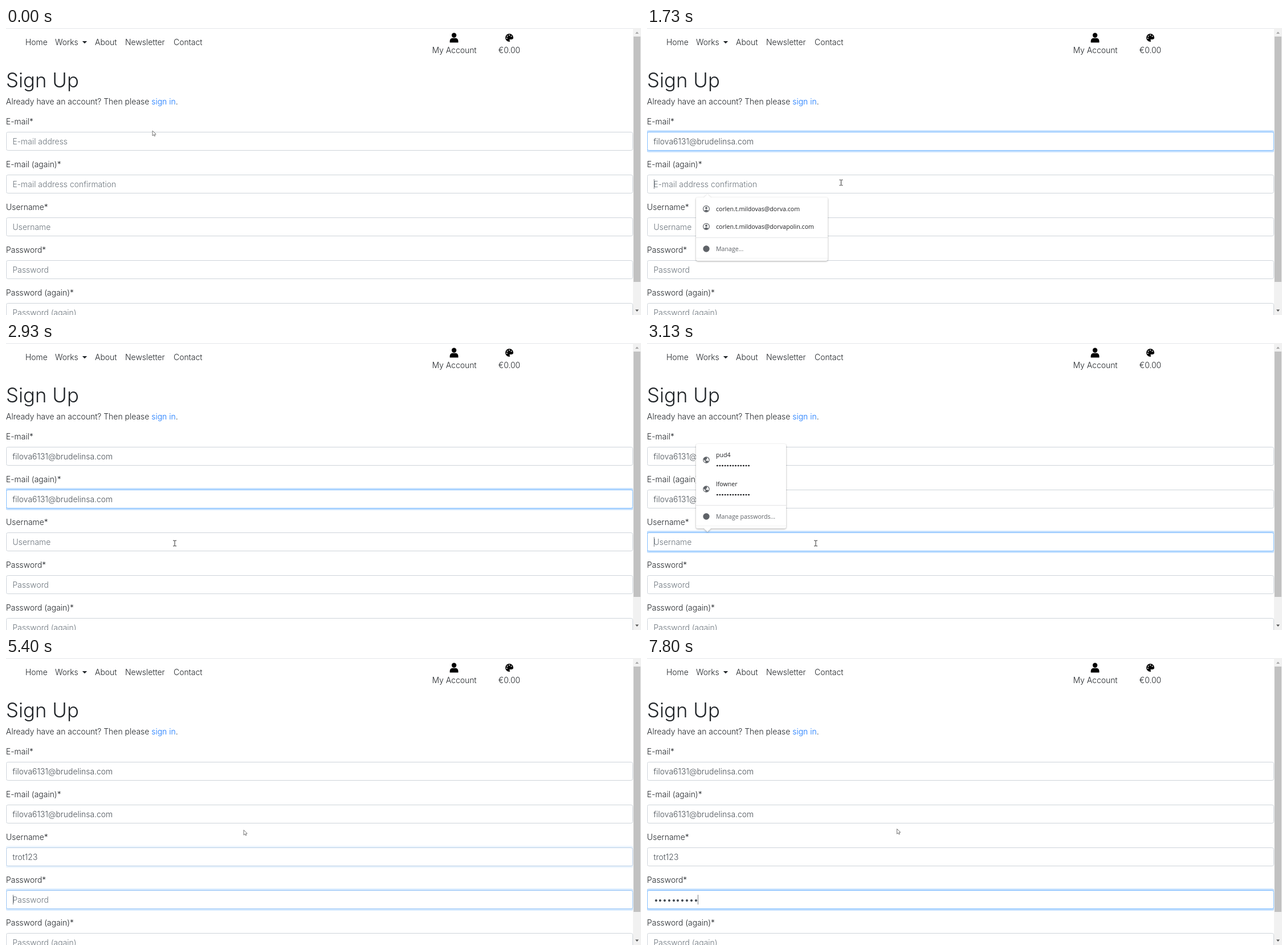
Write an HTML page that moves like this. It is 1114 px wide and 503 px high and loops after 8 s.

```html
<!DOCTYPE html>
<html lang="en">
<head>
<meta charset="utf-8">
<title>Sign Up</title>
<style>
  html, body { margin: 0; width: 100%; height: 100%; overflow: hidden; background: #fff; }
  #stage { position: relative; width: 1114px; height: 503px; overflow: hidden; background: #fff;
    font: 300 13.95px/20px Inter, sans-serif; color: #212529; }
  #stage > *, .t, .pop > *, .bar * { position: absolute; }
  .t { white-space: pre; line-height: 20px; }
  .mid { transform: translateX(-50%); }
  h1.t { margin: 0; font-size: 34.8px; line-height: 42px; font-weight: 300; }
  a { color: #0f73ff; }
  .top { left: 0; top: 0; width: 1100px; height: 1px; background: #e4e6e9; }
  .field { left: 0; width: 1100px; height: 33px; box-sizing: border-box; padding-left: 10.5px;
    border: 1px solid #ced4da; border-radius: 3.5px; background: #fff;
    display: flex; align-items: center; color: #495057; white-space: pre; }
  .field i { width: 1px; height: 17px; margin-right: -1px; background: #7d8288; opacity: 0; }
  .field em { font-style: normal; color: #6c757d; }
  .field b { display: inline-block; width: 7.8px; height: 16px; vertical-align: middle;
    background: radial-gradient(circle at 4px 8px, #495057 1.7px, transparent 2.3px); }
  .pop { background: #fff; border-radius: 3px; opacity: 0;
    filter: drop-shadow(0 1px 1.6px rgba(0,0,0,.34)); }
  .pop .t { font: 400 10.65px/20px "Open Sans", "Noto Sans", sans-serif; color: #202124; }
  .pop .soft { color: #5f6368; }
  .pop hr { left: 0; right: 0; height: 1px; margin: 0; border: 0; background: #e3e4e6; }
  .pop hr.low { background: #f3f4f4; }
  .tail { left: 14.5px; width: 10px; height: 10px; background: #fff; transform: rotate(45deg); }
  .dots { left: 35px; width: 60px; height: 4px;
    background: radial-gradient(circle at 2.2px 2px, #202124 1.1px, transparent 1.7px) 0 0 / 4.62px 4px; }
  .bar { left: 1100px; top: 0; width: 14px; height: 503px; background: #f1f1f1; }
  .thumb { left: 1px; top: 15px; width: 12px; height: 430px; background: #c1c1c1; }
  svg { overflow: visible; }
</style>
</head>
<body>
<div id="stage"></div>
<script>
const stage = document.getElementById('stage');
const LOOP = 8000;
const clamp = v => Math.max(0, Math.min(1, v));
const ease = v => v * v * (3 - 2 * v);

const text = (x, cy, s, cls = '') =>
  `<span class="t ${cls}" style="left:${x}px;top:${cy - 10}px">${s}</span>`;
const svg = (x, y, body) =>
  `<svg width="1" height="1" style="left:${x}px;top:${y}px">${body}</svg>`;

// Icons, each drawn around its own centre
const icon = {
  user: '<circle cy="-4.3" r="4.2"/><path d="M-7.4 8.6V6.2C-7.4 3-5.3 .8-2.6 .8H2.6C5.3 .8 7.4 3 7.4 6.2V8.6Z"/>',
  palette: '<path d="M7 0C7 2.2 5.2 3 3.8 3H1.6C.2 3-.2 4.2 .7 5.1C1.6 6 1 7 0 7A7 7 0 1 1 7 0Z"/>' +
    [[-4.4, .9], [-3.5, -2.6], [0, -4.4], [3.5, -2.6]]
      .map(([x, y]) => `<circle cx="${x}" cy="${y}" r="1" fill="#fff"/>`).join(''),
  person: '<circle r="5.4" fill="none" stroke="#5f6368" stroke-width="1.2"/>' +
    '<circle cy="-1.5" r="1.9" fill="#5f6368"/><path d="M-3.8 3.6Q0 -.4 3.8 3.6Q0 6.6-3.8 3.6Z" fill="#5f6368"/>',
  globe: '<circle r="5.8" fill="#5f6368"/>' +
    '<path d="M-4.6-.8L-1.6 2V4.6Q-4.8 3-4.6-.8ZM1-4.6Q4.6-3 4.6 .4L3.8 2.8L2.4 1.2H-.6V-.6L1.4-1.6Z" fill="#fff"/>',
  disc: '<circle r="5.7" fill="#5f6368"/>',
};

const labels = ['E-mail', 'E-mail (again)', 'Username', 'Password', 'Password (again)'];
const hints = ['E-mail address', 'E-mail address confirmation', 'Username', 'Password', 'Password (again)'];
const fieldTop = i => 182 + 75 * i;

const nav = [[34, 'Home'], [86, 'Works'], [156, 'About'], [209, 'Newsletter'], [294, 'Contact']];
stage.innerHTML =
  '<div class="top"></div>' +
  nav.map(([x, s]) => text(x, 25, s)).join('') +
  svg(138, 22.5, '<path d="M-4.2 0H4.2L0 4.2Z" fill="#212529"/>') +
  svg(786.3, 17, icon.user) + text(786.5, 39, 'My Account', 'mid') +
  svg(882.8, 17, icon.palette) + text(883, 39, '€0.00', 'mid') +
  '<h1 class="t" style="left:0;top:70px">Sign Up</h1>' +
  text(0, 129, 'Already have an account? Then please <a>sign in</a>.') +
  labels.map((s, i) => text(0, 164 + 75 * i, s + '*') +
    `<div class="field" style="top:${fieldTop(i)}px"><span></span><i></i><em>${hints[i]}</em></div>`).join('') +
  '<div class="bar"><div class="thumb"></div>' +
  svg(7, 8, '<path d="M-3 2L0-1.5L3 2Z" fill="#a3a3a3"/>') +
  svg(7, 495, '<path d="M-3-1.5L0 2L3-1.5Z" fill="#505050"/>') + '</div>';

const fields = [...stage.querySelectorAll('.field')].map(box => {
  const [value, caret, hint] = box.children;
  return { box, value, caret, hint, shown: '' };
});

// Suggestion popups
const popups = [];
function popup(from, to, top, w, h, tailUp, body) {
  const el = document.createElement('div');
  el.className = 'pop';
  el.style.cssText = `left:86px;top:${top}px;width:${w}px;height:${h}px`;
  el.innerHTML = `<div class="tail" style="top:${tailUp ? -4 : h - 6}px"></div>` + body;
  stage.append(el);
  popups.push({ el, from, to });
}

const manage = (h, s) =>
  `<hr style="top:${h - 41}px"><hr class="low" style="top:${h - 5}px">` +
  svg(17.5, h - 21, icon.disc) + text(35, h - 21, s, 'soft');

const mails = ['corlen.t.mildovas@dorva.com', 'corlen.t.mildovas@dorvapolin.com']
  .map((s, i) => svg(17.5, 20 + 31 * i, icon.person) + text(35, 20 + 31 * i, s)).join('');
const logins = ['pud4', 'lfowner'].map((s, i) => {
  const y = 19 + 50.5 * i;
  return svg(17.5, y + 9, icon.globe) + text(35, y, s) + `<div class="dots" style="top:${y + 17}px"></div>`;
}).join('');
const list = names => names.map((s, i) => text(10.5, 20 + 31.3 * i, s)).join('');

popup(600, 1260, 222, 231, 111, true, mails + manage(111, 'Manage...'));
popup(1665, 2030, 297, 231, 111, true, mails + manage(111, 'Manage...'));
popup(2965, 3965, 177, 158, 148, false, logins + manage(148, 'Manage passwords...'));
popup(3960, 4595, 160, 85, 164, false, list(['troty', 'trot', 'trot1', 'trot12', 'TrotUser1']));
popup(4595, 4725, 372, 85, 71, true, list(['trot1', 'trot12']));
popup(4725, 4860, 372, 85, 39, true, list(['trot12']));

// Edits: [time, field, content]; a number means that many password dots
const mail = 'filova6131@brudelinsa.com';
const name = 'trot123';
const edits = [
  [1260, 0, mail],
  [2030, 1, mail],
  ...[3965, 4130, 4265, 4390, 4595, 4725, 4860].map((t, i) => [t, 2, name.slice(0, i + 1)]),
  ...[6260, 6390, 6525, 6725, 6860, 6925, 7125, 7525, 7665, 7795].map((t, i) => [t, 3, i + 1]),
];
// Focus: [time, field, start of the ring transition]
const focus = [[590, 0, 590], [1660, 1, 1725], [2965, 2, 2965], [5305, 3, 5305]];
const carets = [...focus, ...edits].sort((a, b) => a[0] - b[0]);

// Pointer path: [time, x, y]
const path = [
  [0, 257, 180], [190, 257, 180], [330, 260.5, 199], [1130, 260.5, 199], [1510, 340.5, 271],
  [1980, 340.5, 271], [2065, 376.5, 290], [2130, 376.5, 290], [2400, 390, 318], [2570, 390, 318],
  [2900, 296, 351], [3380, 296, 351], [3530, 417, 301.5], [5420, 417, 301.5], [5670, 438.5, 299.5],
  [LOOP, 438.5, 299.5],
];
stage.insertAdjacentHTML('beforeend', svg(0, 0,
  '<path d="M0 0V8.8L2.1 6.9L3.5 9.7L4.8 9L3.6 6.4L6.2 6.1Z" fill="#fff" stroke="#555" stroke-width=".8"/>') +
  svg(0, 0, '<path d="M-3-4.8H-.8L0-4.2L.8-4.8H3M-3 4.8H-.8L0 4.2L.8 4.8H3M0-4.2V4.2" fill="none" stroke="#333"/>'));
const [arrow, beam] = [...stage.children].slice(-2);

function drawPointer(t) {
  const k = path.findIndex(p => p[0] > t);
  const [t0, x0, y0] = path[k - 1], [t1, x1, y1] = path[k];
  const p = (t - t0) / (t1 - t0);
  const x = x0 + (x1 - x0) * p, y = y0 + (y1 - y0) * p;
  const inField = y >= 182 && (y - 182) % 75 <= 33.5;
  arrow.style.display = inField ? 'none' : '';
  beam.style.display = inField ? '' : 'none';
  arrow.style.transform = beam.style.transform = `translate(${x}px,${y}px)`;
}

function drawFields(t) {
  const last = carets.filter(c => c[0] <= t).pop();
  const lit = last && (t - last[0]) % 1000 < 500;
  fields.forEach((f, i) => {
    const edit = edits.filter(e => e[1] === i && e[0] <= t).pop();
    const now = edit ? edit[2] : '';
    if (now !== f.shown) {
      f.shown = now;
      f.value.innerHTML = typeof now === 'number' ? '<b></b>'.repeat(now) : now;
      f.hint.style.display = now ? 'none' : '';
    }
    f.caret.style.opacity = lit && last[1] === i ? 1 : 0;

    const ramp = step => step ? ease(clamp((t - step[2]) / 150)) : 0;
    const k = ramp(focus[i]) - ramp(focus[i + 1]);
    const mix = (a, b) => Math.round(a + (b - a) * k);
    f.box.style.borderColor = `rgb(${mix(206, 128)},${mix(212, 189)},${mix(218, 255)})`;
    f.box.style.boxShadow = k > 0 ? `0 0 0 2.8px rgba(0,123,255,${.25 * k})` : 'none';
  });
}

function drawPopups(t) {
  for (const { el, from, to } of popups) {
    const o = clamp((t - from) / 40) * (1 - clamp((t - to) / 130));
    el.style.opacity = o;
    el.style.transform = t > to ? `scale(${1 - .057 * (1 - o)})` : 'none';
  }
}

function draw(t) {
  drawFields(t);
  drawPopups(t);
  drawPointer(t);
}

const start = performance.now();
(function tick() {
  draw((performance.now() - start) % LOOP);
  requestAnimationFrame(tick);
})();
</script>
</body>
</html>
```
